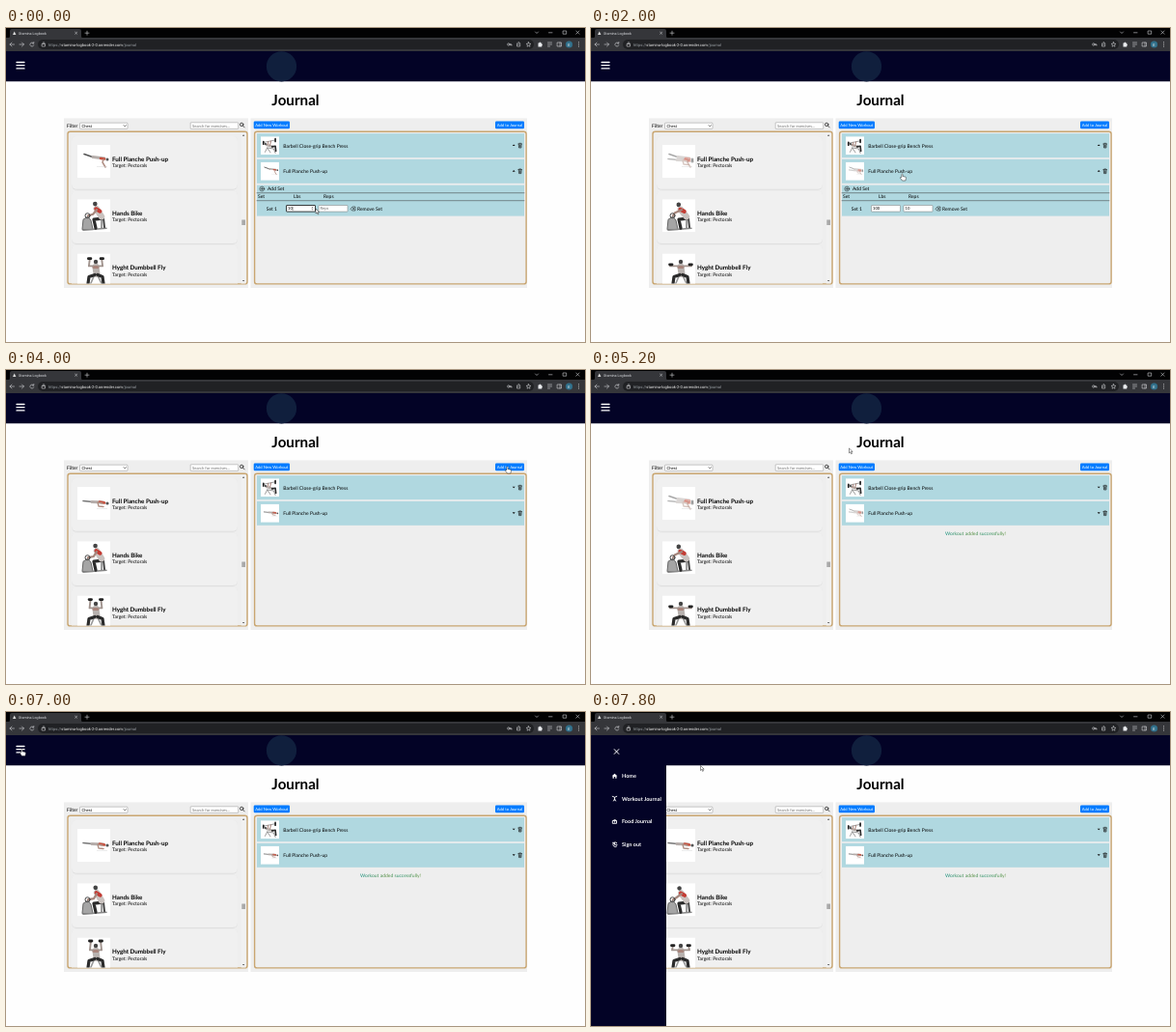
Animation of 600 by 325 pixels, one loop 8000 ms. Source, as an HTML page:

```html
<!DOCTYPE html>
<html lang="en">
<head>
<meta charset="utf-8">
<title>Stamina Logbook</title>
<style>
html, body { margin: 0; width: 100%; height: 100%; overflow: hidden; background: #fefefe; }
svg { display: block; width: 100vw; height: 100vh; }
symbol { overflow: hidden; }
text { font: 5px Lato, sans-serif; text-rendering: geometricPrecision; white-space: pre; }
.chrome text { font-family: Roboto, sans-serif; }
.small { font-size: 4.17px; }
.name { font-size: 6.25px; font-weight: 700; }
.line { fill: none; stroke-linecap: round; stroke-linejoin: round; }
.menu text { font-size: 5.5px; font-weight: 700; fill: #fff; }
</style>
</head>
<body>
<svg viewBox="0 0 600 325" preserveAspectRatio="none">
  <defs>
    <linearGradient id="tint">
      <stop offset="0" stop-color="#17907f"/><stop offset=".45" stop-color="#5d9144"/>
      <stop offset=".65" stop-color="#21906a"/><stop offset="1" stop-color="#5f9440"/>
    </linearGradient>
    <filter id="soft" x="-5%" y="-10%" width="110%" height="125%">
      <feDropShadow dx="0" dy=".4" stdDeviation=".5" flood-opacity=".16"/>
    </filter>
    <clipPath id="listClip"><rect x="65" y="108" width="179" height="156.5"/></clipPath>

    <symbol id="planche" viewBox="0 0 34 34">
      <rect width="34" height="34" fill="#fff"/>
      <g class="line" id="plancheUp">
        <path d="M7 9.500L17 13" stroke="#555" stroke-width="1.600"/>
        <path d="M16 12.500L28 14" stroke="#b5adaa" stroke-width="3"/>
        <path d="M24 14l4 .5" stroke="#c8513f" stroke-width="2.400"/>
        <path d="M27 15l-1 3 3 5" stroke="#b08f84" stroke-width="1.500"/>
        <circle cx="31" cy="15" r="1.500" fill="#555"/>
      </g>
      <g class="line" id="plancheDown">
        <path d="M6 14.500L16 15.500" stroke="#777" stroke-width="1.600"/>
        <path d="M15 15.500L27 16" stroke="#b5adaa" stroke-width="3.200"/>
        <path d="M23 15.500l5 1" stroke="#c8513f" stroke-width="2.600"/>
        <path d="M26 17l-5-1 1 4 5 .5" stroke="#b08f84" stroke-width="1.400"/>
        <circle cx="31" cy="17" r="1.600" fill="#555"/>
      </g>
      <path d="M20 22.500h11" stroke="#ccc" stroke-width=".4"/>
    </symbol>

    <symbol id="bike" viewBox="0 0 34 34">
      <rect width="34" height="34" fill="#fff"/>
      <g class="line">
        <path d="M5 31l1-10 5-3 3 4 2 9z" stroke="#666" stroke-width="1" fill="#a5a5a5"/>
        <path d="M6 32l24-2M25 30v-9" stroke="#888" stroke-width="1.600"/>
        <path d="M26 20l-9 1 2 9" stroke="#2b2b2b" stroke-width="3.200"/>
        <path d="M27 20l1 9" stroke="#444" stroke-width="2"/>
        <g id="rider">
          <path d="M25 18L20 10" stroke="#c9c2bf" stroke-width="6.500"/>
          <path d="M19.500 10l4 2.500" stroke="#c43c34" stroke-width="4"/>
          <circle cx="18.500" cy="4.800" r="2.300" fill="#444"/>
        </g>
        <path id="bikeArm" stroke="#a5867c" stroke-width="2.200"/>
        <circle cx="10.500" cy="17" r="2.500" stroke="#444" stroke-width="1"/>
      </g>
    </symbol>

    <symbol id="fly" viewBox="0 0 34 34">
      <rect width="34" height="34" fill="#fff"/>
      <g class="line">
        <path d="M13 33l6-14 7 14" stroke="#999" stroke-width="1.600"/>
        <path d="M19 14l1 7" stroke="#b8b2af" stroke-width="7"/>
        <path d="M17 14h4" stroke="#a9857c" stroke-width="3"/>
        <path d="M18 22l-6 2-1 7M21 22l5 2 1 7" stroke="#2b2b2b" stroke-width="3.200"/>
        <circle cx="19" cy="8.500" r="2.200" fill="#444"/>
        <path id="flyArms" stroke="#a1948e" stroke-width="1.900"/>
        <path id="flyBells" stroke="#222" stroke-width="2.800"/>
      </g>
    </symbol>

    <symbol id="bench" viewBox="0 0 34 34">
      <rect width="34" height="34" fill="#fff"/>
      <g class="line">
        <path d="M8 29l4-8 12 2 3 8M12 21l6 9" stroke="#777" stroke-width="1.300"/>
        <path d="M11 16l11 3" stroke="#b8b2af" stroke-width="4.500"/>
        <path d="M21 19l6-1 1 9" stroke="#2b2b2b" stroke-width="3"/>
        <circle cx="9" cy="14" r="2" fill="#444"/>
        <g id="barbell">
          <path d="M4 11L28 6" stroke="#555" stroke-width="1"/>
          <path d="M5 9v5M27 4v5" stroke="#222" stroke-width="3"/>
          <path d="M13 15l1-6M17 16l2-8" stroke="#a9857c" stroke-width="1.800"/>
        </g>
      </g>
    </symbol>

    <g id="trash" class="line" stroke="#111" stroke-width=".6">
      <path d="M-1.800-1.600h3.600M-.7-2.300h1.400M-1.400-1.600l.2 4h2.400l.2-4M-.4-.4v1.900M.4-.4v1.900"/>
    </g>
  </defs>

  <rect width="600" height="325" fill="#fefefe"/>

  <g class="chrome">
    <rect width="600" height="11" fill="#020203"/>
    <path d="M2 10.500q2 0 2-2V3q0-2 2-2h70q2 0 2 2v5.500q0 2 2 2z" fill="#35363a"/>
    <rect y="10" width="600" height="14" fill="#35363a"/>
    <rect x="33" y="12" width="514" height="10" rx="5" fill="#202124"/>
    <path d="M7 7l1.700-3.400L10.400 7z" fill="#ddd"/>
    <text x="13" y="6.800" style="font-size:3.700px" fill="#dfe1e5">Stamina Logbook</text>
    <g class="line" stroke="#d0d2d5" stroke-width=".6">
      <path d="M71.600 4.200l2 2m0-2l-2 2M82 5.200h4M84 3.200v4"/>
      <path d="M548.500 4l1.500 1.500 1.500-1.500M562.500 4.800h3.500M577.500 3h3.200v3.200h-3.200zM590.800 3l3.200 3.200m0-3.200l-3.200 3.200"/>
      <path d="M8.500 17h-4.500m2-2l-2 2 2 2M14 17h4.500m-2-2l2 2-2 2M28.500 15.800a2 2 0 1 0 .3 2M28.800 14.500v1.500h-1.500"/>
      <path d="M37.500 16.500h3v2.500h-3zM38.200 16.500v-1a.8.800 0 0 1 1.600 0v1M522 17h2v1m-1-1v.8M529.500 16v3h3.200v-3M531 17.500v-3l1.300 1"/>
      <circle cx="520.800" cy="17" r="1.200"/>
      <path d="M541.500 14.700l.7 1.500 1.700.2-1.300 1.200.4 1.600-1.500-.8-1.500.8.4-1.600-1.300-1.200 1.700-.2z"/>
      <path d="M561.500 15h4M561.500 17h4M561.500 19h2M571.500 15h4v4h-4zM574 15v4"/>
    </g>
    <path d="M551.500 15.500h1q.8-1.800 1.600 0h1.200v1.300q1.500.6 0 1.400v1.300h-3.800z" fill="#e8eaed"/>
    <circle cx="583.500" cy="17" r="3.600" fill="#31708b"/>
    <text x="582.300" y="18.500" style="font-size:4px" fill="#fff">E</text>
    <path d="M593.500 14.800v.1m0 2v.1m0 2v.1" class="line" stroke="#ddd" stroke-width=".9"/>
    <text x="44" y="18.600" style="font-size:4.100px" fill="#9aa0a6">https://<tspan fill="#eee">stamina-logbook-2-0.onrender.com</tspan>/journal</text>
  </g>

  <rect y="24" width="600" height="31.300" fill="#030326"/>
  <circle cx="285.500" cy="39.800" r="15.600" fill="#101f3d"/>
  <path d="M11 35.500h8M11 38.700h8M11 41.900h8" class="line" stroke="#fff" stroke-width="1.300"/>
  <text x="300" y="80" text-anchor="middle" style="font-size:15.200px;font-weight:700">Journal</text>

  <rect x="60" y="93.500" width="191" height="175.500" fill="#eee"/>
  <rect x="253.500" y="93.500" width="286.500" height="175.500" fill="#eee"/>

  <text x="63" y="102.900">Filter</text>
  <g fill="#fff" stroke="#767676" stroke-width=".4">
    <rect x="76.500" y="98.200" width="49.500" height="6.200" rx=".8"/>
    <rect x="191.200" y="97.800" width="49.500" height="6.600" rx=".6"/>
  </g>
  <text class="small" x="78.500" y="102.800">Chest</text>
  <path d="M122 100.700l1.200 1.200 1.200-1.200" class="line" stroke="#111" stroke-width=".6"/>
  <text class="small" x="193" y="102.500" fill="#757575">Search for exercises...</text>
  <g class="line" stroke="#111" stroke-width=".7"><circle cx="244.200" cy="99.900" r="1.700"/><path d="M245.500 101.200l1.700 1.700"/></g>
  <rect x="64" y="107.200" width="186" height="157.700" rx="2.500" fill="#eee" stroke="#c9a671" stroke-width="1.400"/>
  <g id="cards" clip-path="url(#listClip)"></g>
  <rect x="243.700" y="108.500" width="4.800" height="156" fill="#f1f1f1"/>
  <rect x="244.300" y="198.500" width="3.700" height="5.500" fill="#aaa"/>
  <path d="M244.900 111.700l1.200-1.400 1.200 1.400zM244.900 260.900l1.200 1.400 1.200-1.400z" fill="#444"/>

  <rect x="257.600" y="107.200" width="281.500" height="157.700" rx="2.500" fill="#eee" stroke="#c9a671" stroke-width="1.400"/>
  <g fill="#007bff">
    <rect x="256.700" y="96.400" width="37.300" height="7.800" rx="1.300"/>
    <rect x="507" y="96.400" width="30" height="7.800" rx="1.300"/>
  </g>
  <g fill="#fff" text-anchor="middle">
    <text class="small" x="275.300" y="101.800">Add New Workout</text>
    <text class="small" x="522" y="101.800">Add to Journal</text>
  </g>
  <g id="rows"></g>

  <g id="sets">
    <rect x="260" y="162.600" width="277" height="32" fill="#b0d8e0"/>
    <g class="line" stroke="#111" stroke-width=".5">
      <circle cx="265.300" cy="166.500" r="2.400"/><path d="M264 166.500h2.600M265.300 165.200v2.600"/>
      <path d="M260 170.700h277M260 178.700h277" stroke="#333"/>
      <path d="M357.300 187l1.700-2h3v4h-3zM359.300 186l1.700 2m0-2l-1.700 2"/>
    </g>
    <text x="271" y="168.300">Add Set</text>
    <text x="261" y="176.400">Set</text>
    <text x="298" y="176.400">Lbs</text>
    <text x="329" y="176.400">Reps</text>
    <text x="269.700" y="188.700">Set 1</text>
    <text x="364" y="188.700">Remove Set</text>
    <g fill="#fff" stroke="#767676" stroke-width=".5">
      <rect id="lbsBox" x="290.500" y="183.500" width="30" height="6.600" rx=".5"/>
      <rect id="repsBox" x="324" y="183.500" width="30" height="6.600" rx=".5"/>
    </g>
    <text id="lbs" class="small" x="292" y="188.300"></text>
    <text id="reps" class="small" x="325.500" y="188.300"></text>
    <path id="spinner" d="M316.500 186.200l1-1.200 1 1.200zM316.500 187.400l1 1.200 1-1.200z" fill="#555"/>
    <path id="caret" d="M0 184.700v4.300" stroke="#111" stroke-width=".4"/>
  </g>
  <text id="message" x="398.500" y="171" text-anchor="middle" fill="url(#tint)">Workout added successfully!</text>

  <g id="sidebar" class="menu">
    <rect y="24" width="78" height="301" fill="#030326"/>
    <path d="M24.200 38.600l4.600 4.800m0-4.800l-4.600 4.800" class="line" stroke="#fff" stroke-width="1"/>
    <path d="M21.700 66.300l2.800-2.600 2.800 2.600h-.8v2.400h-1.300v-1.700h-1.400v1.700h-1.300v-2.400z" fill="#fff"/>
    <g class="line" stroke="#fff" stroke-width=".9">
      <path d="M22.200 87.400q2.300 2 4.600 0M24.500 88.500v2.500M23.400 92l1.100-2 1.100 2"/>
      <path d="M22.700 112.500h3.800v2.800h-3.800zM23.400 112.300l1.200-1.300 1.200 1.300M24.600 113.500v.7"/>
      <path d="M26.700 135.500a2.300 2.300 0 1 0 0 3.500M24.500 135.800v1.600h2.500M22.500 135.300h2"/>
    </g>
    <text x="32" y="68.200">Home</text>
    <text x="32" y="91.700">Workout Journal</text>
    <text x="32" y="115.400">Food Journal</text>
    <text x="32" y="139.200">Sign out</text>
  </g>

  <g id="pointer" stroke="#111" stroke-width=".45" stroke-linejoin="round" fill="#fff">
    <path id="arrow" d="M0 0v5l1.200-1.100.9 2 .9-.4-.9-1.900h1.600z"/>
    <path id="hand" d="M-.6 3.500V.5q.6-1 1.200 0v2l3 .7q.6.300.4 1.200l-.6 2.600h-3.400l-2-2.700q-.3-.8.500-.8z"/>
  </g>
</svg>
<script>
const LOOP = 8000, CYCLE = 3200;
const el = id => document.getElementById(id);
const clamp = v => Math.min(1, Math.max(0, v));
const smooth = v => { v = clamp(v); return v * v * (3 - 2 * v); };
const show = (id, on) => el(id).setAttribute("visibility", on ? "visible" : "hidden");
const set = (id, name, value) => el(id).setAttribute(name, value);

const cards = [["planche", "Full Planche Push-up"], ["bike", "Hands Bike"], ["fly", "Hyght Dumbbell Fly"]];
el("cards").innerHTML = cards.map(([figure, name], i) => `
  <g transform="translate(0 ${i * 56.2})">
    <rect x="68" y="112" width="172" height="54.700" rx="5" fill="#f0f0f0" filter="url(#soft)"/>
    <use href="#${figure}" x="74" y="121" width="34" height="34"/>
    <text class="name" x="110" y="137.600">${name}</text>
    <text x="110" y="144.300">Target: Pectorals</text>
  </g>`).join("");

const rows = [["bench", "Barbell Close-grip Bench Press"], ["planche", "Full Planche Push-up"]];
el("rows").innerHTML = rows.map(([figure, name], i) => `
  <g transform="translate(0 ${i * 26.6})">
    <rect x="260" y="109.200" width="277" height="25" fill="#b0d8e0"/>
    <use href="#${figure}" x="264" y="112.200" width="19" height="19"/>
    <text x="287.300" y="123.800">${name}</text>
    <path class="toggle" fill="#111"/>
    <use href="#trash" x="532.700" y="121.600"/>
  </g>`).join("");

// Pointer stops: time, x, y
const stops = [[0, 321, 187], [300, 321, 187], [700, 338, 187], [1300, 338, 187], [1800, 322.5, 151],
  [2200, 322.5, 151], [2600, 416, 209], [2900, 416, 209], [3600, 519.500, 100], [4800, 519.500, 100],
  [5200, 267.500, 81], [5900, 16.500, 38.500], [7150, 16.500, 38.500], [7750, 113.500, 55.500], [8000, 113.500, 55.500]];

function pointerAt(t) {
  const i = stops.findIndex(s => s[0] > t);
  const [t0, x0, y0] = stops[i - 1], [t1, x1, y1] = stops[i];
  const k = smooth((t - t0) / (t1 - t0));
  return [x0 + (x1 - x0) * k, y0 + (y1 - y0) * k];
}

function drawFigures(t) {
  const phase = (t + 1200) % CYCLE;
  const raised = smooth(phase / 300 + .5) - smooth((phase - 1600) / 300 + .5)
    + smooth((phase - CYCLE) / 300 + .5);
  set("plancheUp", "opacity", raised);
  set("plancheDown", "opacity", 1 - raised);

  const wave = Math.cos((t - 500) / CYCLE * 2 * Math.PI);
  set("rider", "transform", `rotate(${wave * 4 - 3} 25 19)`);
  set("bikeArm", "d", `M20 11L${15 + wave * 2} ${15 + wave}L11 17`);

  const spread = 5 + (1 - wave) * 2.5, height = 3.5 + (1 - wave) * 4;
  const left = 19 - spread, right = 19 + spread;
  set("flyArms", "d", `M16 13L${left - 1} 13L${left} ${height}M22 13L${right + 1} 13L${right} ${height}`);
  set("flyBells", "d", `M${left - 1.5} ${height}h2.500M${right - 1} ${height}h2.500`);
  set("barbell", "transform", `translate(0 ${1 - wave})`);
}

function drawForm(t) {
  const open = t < 2300, onLbs = t < 700, onReps = !onLbs && t < 1800;
  const lbs = t < 200 ? "10" : "100";
  const reps = t < 900 ? "" : t < 1100 ? "1" : "10";
  el("sets").style.display = open ? "" : "none";
  el("lbs").textContent = lbs;
  el("reps").textContent = reps || "Reps";
  set("reps", "fill", reps ? "#111" : "#757575");
  for (const [id, focused] of [["lbsBox", onLbs], ["repsBox", onReps]]) {
    set(id, "stroke", focused ? "#111" : "#767676");
    set(id, "stroke-width", focused ? .8 : .5);
  }
  el("spinner").style.display = onLbs ? "" : "none";
  el("caret").style.display = (onLbs || onReps) && t % 1000 < 500 ? "" : "none";
  set("caret", "transform", `translate(${onLbs ? 292.3 + lbs.length * 2.42 : 325.8 + reps.length * 2.42} 0)`);
  for (const toggle of document.querySelectorAll(".toggle"))
    toggle.setAttribute("d", open ? "M524.700 122.100l1.500-1.600 1.500 1.600z" : "M524.700 120.700l1.500 1.600 1.500-1.600z");
}

function draw(t) {
  drawFigures(t);
  drawForm(t);
  show("message", t >= 4300);
  const slide = smooth((t - 7080) / 450);
  show("sidebar", slide > 0);
  set("sidebar", "transform", `translate(${-78 * (1 - slide)} 0)`);
  const [x, y] = pointerAt(t);
  set("pointer", "transform", `translate(${x} ${y})`);
  const hand = (t >= 1700 && t < 2300) || (t >= 3500 && t < 4900) || (t >= 5850 && t < 7200);
  show("hand", hand);
  show("arrow", !hand);
}

function tick() {
  draw(performance.now() % LOOP);
  requestAnimationFrame(tick);
}
tick();
</script>
</body>
</html>
```
